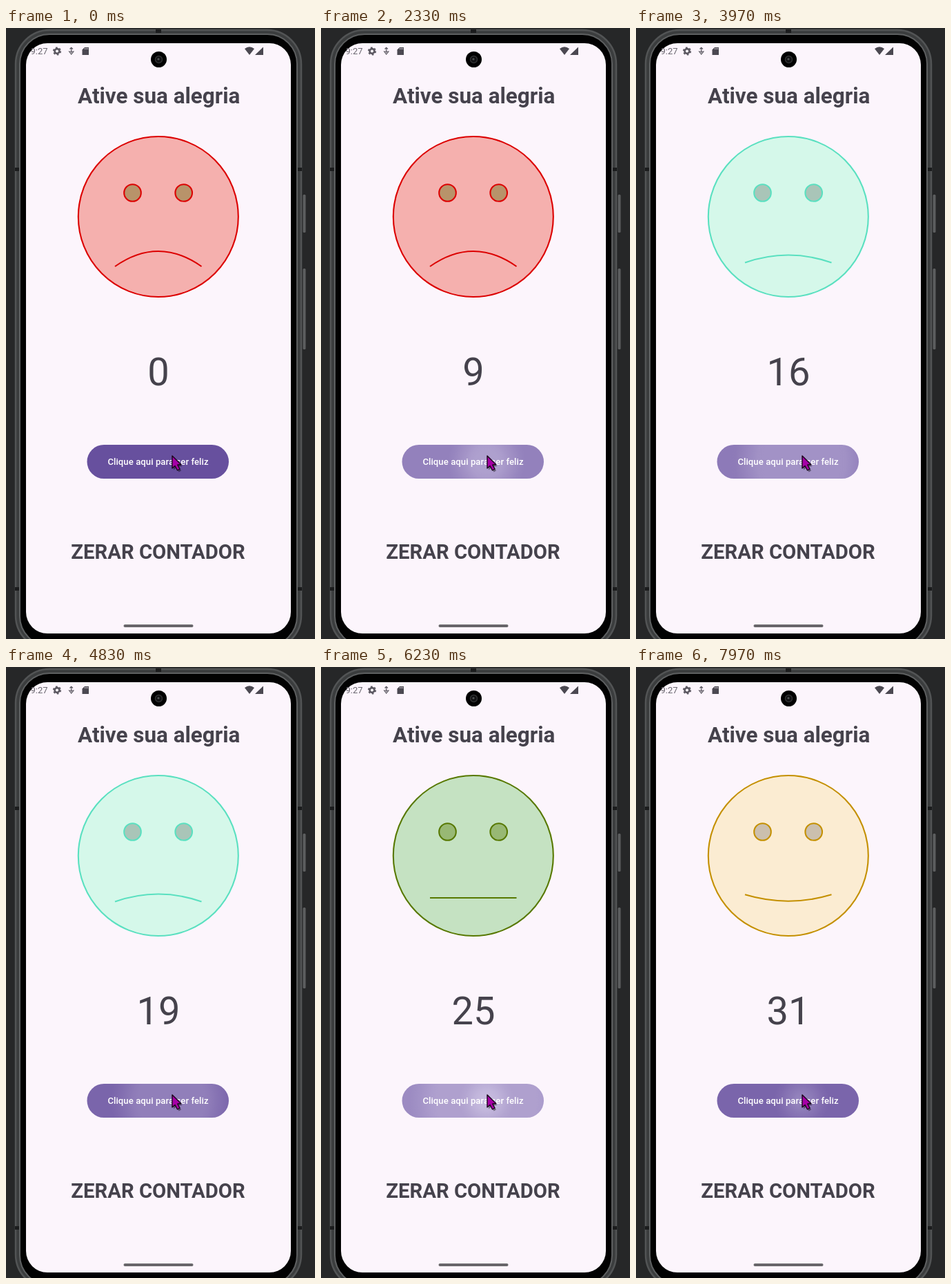
An HTML page for the animation above (8 s loop, 448x884 px).

```html
<!DOCTYPE html>
<html lang="pt">
<head>
<meta charset="utf-8">
<title>Ative sua alegria</title>
<style>
html, body { margin: 0; width: 100%; height: 100%; overflow: hidden; background: #262728; }
svg { display: block; width: 100%; height: 100%; font-family: Roboto, "Noto Sans", sans-serif; }
.c { text-anchor: middle; fill: #45424c; }
</style>
</head>
<body>
<svg viewBox="0 0 448 884">
  <defs>
    <radialGradient id="ripple" gradientUnits="userSpaceOnUse" cx="240" cy="627" r="128"></radialGradient>
    <clipPath id="screen"><rect x="37" y="22" width="376" height="30"/></clipPath>
  </defs>
  <rect width="448" height="884" fill="#262728"/>

  <!-- phone -->
  <g fill="#5c5e5f">
    <rect x="430.5" y="241" width="4" height="55" rx="1.5"/>
    <rect x="430.5" y="348" width="4" height="117" rx="1.5"/>
  </g>
  <rect x="14" y="3" width="414" height="896" rx="49" fill="#3b3d3e" stroke="#525455" stroke-width="2.5"/>
  <rect x="20" y="9" width="402" height="885" rx="43" fill="#020202" stroke="#5e6061" stroke-width="2"/>
  <path fill="#1b1c1d" d="M217 2h8v5h-8zM13 202h6v5h-6zM13 809h6v5h-6zM423 202h6v5h-6zM423 809h6v5h-6z"/>
  <rect x="29" y="22" width="384" height="854" rx="31" fill="#fcf5fc"/>

  <!-- status bar -->
  <text x="35.5" y="38" font-size="13" fill="#6a6770" clip-path="url(#screen)">9:27</text>
  <g fill="none" stroke="#5a5760">
    <circle cx="74" cy="33.5" r="3.4" stroke-width="2.6"/>
    <circle cx="74" cy="33.5" r="5.2" stroke-width="1.8" stroke-dasharray="2.7 2.75"/>
    <path d="M94.7 28v6M92.5 30.5l2.2-2.2 2.2 2.2M91.5 34l3.2 4 3.2-4zM94.7 33v3" stroke-width="1.2"/>
  </g>
  <g fill="#4b4851">
    <path d="M114 28h6v11h-9.5v-7.5z"/>
    <path d="M346 30q7-5.5 14 0l-7 9z"/>
    <path d="M373 27.5v11.5h-12z"/>
  </g>
  <path d="M114.5 29v2M116.5 29v2M118.5 29v2" stroke="#fcf5fc" stroke-width=".7"/>
  <circle cx="221.5" cy="45.5" r="11.5"/>
  <circle cx="221.5" cy="45.5" r="5" fill="#111213" stroke="#303132" stroke-width="1.5"/>
  <circle cx="221" cy="45" r="1.6" fill="#505253"/>

  <text class="c" x="221.7" y="108.6" font-size="31.4" font-weight="700">Ative sua alegria</text>

  <g id="face" stroke-width="2.1">
    <circle cx="220.8" cy="273" r="116"/>
    <g id="eyes">
      <circle cx="183.5" cy="238.5" r="12.3"/>
      <circle cx="257.7" cy="238.5" r="12.3"/>
    </g>
    <path id="mouth" fill="none"/>
  </g>

  <text id="count" class="c" x="221" y="517" font-size="56">0</text>

  <rect x="117.5" y="603" width="205.5" height="49" rx="24.5" fill="url(#ripple)"/>
  <text x="220.5" y="632.3" font-size="13.1" font-weight="500" letter-spacing=".07" text-anchor="middle" fill="#fff">Clique aqui para ser feliz</text>

  <text class="c" x="220.5" y="768.3" font-size="29.3" font-weight="700">ZERAR CONTADOR</text>
  <rect x="170.5" y="863" width="101" height="4" rx="2" fill="#68666a"/>

  <!-- pointer -->
  <g stroke-linejoin="round">
    <path d="M243 621.5v18l4-3.5 3.5 6.5 3.5-2-3.3-6 5-.5z" opacity=".4"/>
    <path d="M241 619v18l4-3.5 3.5 6.5 3.5-2-3.3-6 5-.5z" fill="#a600a6" stroke="#1c061c" stroke-width="1.4"/>
  </g>
</svg>
<script>
const LOOP = 8000;
const $ = id => document.getElementById(id);
const clamp = v => Math.max(0, Math.min(1, v));

// one mood per ten clicks
const moods = [
  { fill: '#f5b0ae', line: '#dc0000', eye: '#b8936a', bend: -11 },
  { fill: '#d5f8ea', line: '#5ae0c0', eye: '#a9c5b8', bend: -5.5 },
  { fill: '#c5e2c2', line: '#577800', eye: '#98b874', bend: 0 },
  { fill: '#fbecd2', line: '#c49000', eye: '#cbbfae', bend: 4.7 }
];

// [click number, time], evenly paced in between
const pace = [[1, 150], [5, 1140], [10, 2370], [16, 3900], [19, 4790], [20, 5040],
  [25, 6130], [26, 6310], [30, 7400], [31, 7730], [32, 8050]];
// [time, lasting glow of the button]
const glow = [[50, 0], [500, 2], [1230, 3], [2330, 2], [3970, 2], [4830, 1], [6230, 2.8], [7970, 1]];
const rest = [103, 80, 158], lit = [198, 186, 222];

function lerp(keys, x) {
  if (x <= keys[0][0]) return keys[0][1];
  for (let i = 1; i < keys.length; i++) {
    const [x0, y0] = keys[i - 1], [x1, y1] = keys[i];
    if (x <= x1) return y0 + (y1 - y0) * (x - x0) / (x1 - x0);
  }
  return keys[keys.length - 1][1];
}

const clicks = Array.from({ length: 32 }, (_, i) => lerp(pace, i + 1));
const HOLD = 100, FADE = 320, RADIUS = 128, STEPS = 16;

const stops = Array.from({ length: STEPS + 1 }, (_, i) => {
  const stop = document.createElementNS('http://www.w3.org/2000/svg', 'stop');
  stop.setAttribute('offset', i / STEPS);
  return $('ripple').appendChild(stop);
});

function shade(level) {
  const f = clamp(level / 5);
  return `rgb(${rest.map((c, k) => Math.round(c + (lit[k] - c) * f))})`;
}

function drawRipple(t) {
  const base = lerp(glow, t);
  const waves = clicks.map(c => t - c + HOLD).filter(age => age >= 0 && age < FADE);
  stops.forEach((stop, i) => {
    const r = i / STEPS * RADIUS;
    let level = base;
    for (const age of waves) {
      const reach = 12 + 0.4 * age;
      level += 1.6 * Math.sqrt(1 - age / FADE) * clamp((reach - r) / 34 + 0.5);
    }
    stop.setAttribute('stop-color', shade(level));
  });
}

function draw(t) {
  const n = clicks.filter(c => c <= t).length;
  const mood = moods[Math.min(3, Math.floor(n / 10))];
  $('count').textContent = n;
  $('face').setAttribute('fill', mood.fill);
  $('face').setAttribute('stroke', mood.line);
  $('eyes').setAttribute('fill', mood.eye);
  const y = 334 - mood.bend;
  $('mouth').setAttribute('d', `M158 ${y}Q220.8 ${334 + 3 * mood.bend} 283.5 ${y}`);
  drawRipple(t);
}

const start = performance.now();
function tick() {
  draw((performance.now() - start) % LOOP);
  requestAnimationFrame(tick);
}
tick();
</script>
</body>
</html>
```
